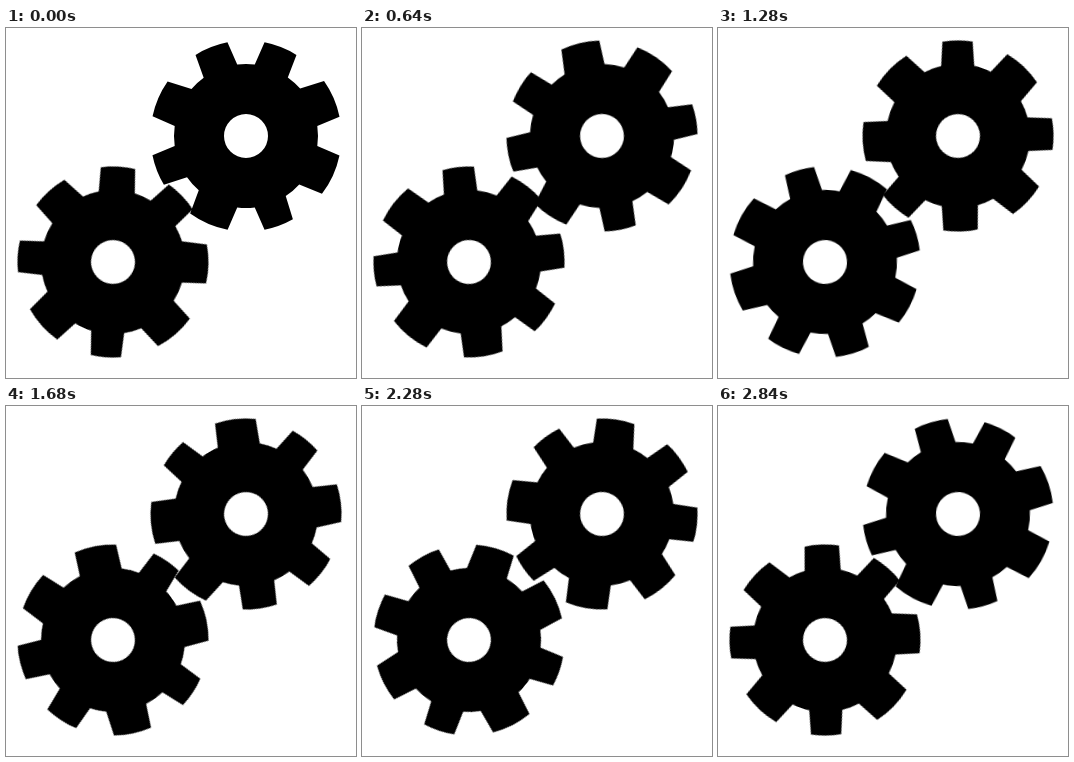
Write an HTML page that moves like this. It is 350 px wide and 350 px high and loops after 2880 ms.

```html
<!DOCTYPE html>
<html lang="en">
<head>
<meta charset="utf-8">
<title>Gears</title>
<style>
  html, body { margin: 0; width: 100%; height: 100%; overflow: hidden; background: #fff; }
  svg { display: block; width: 100%; height: 100%; }
</style>
</head>
<body>
<svg viewBox="0 0 350 350"></svg>
<script>
const LOOP = 2880, STEPS = 72;
const TIP = 95.5, ROOT = 72, HOLE = 22;

// Hand-cut teeth, degrees clockwise from the top: [foot, tip, tip, foot]
const TEETH = [
  [-36, -31.9, -11.2, -7],
  [7, 11.2, 31.9, 35.5],
  [48.8, 54.8, 78.3, 82],
  [98, 101.8, 127.3, 132.3],
  [146.5, 150.6, 168.8, 173],
  [187, 191.1, 215.8, 221],
  [235, 239.3, 258.4, 262],
  [278, 281.9, 304.8, 310.8]
];

const GEARS = [
  { x: 107, y: 234, start: 24.6, turn: 360 },
  { x: 240, y: 108, start: 0, turn: -360 }
];

const svg = document.querySelector('svg');

function point(radius, degrees) {
  const a = degrees * Math.PI / 180;
  return `${(radius * Math.sin(a)).toFixed(2)} ${(-radius * Math.cos(a)).toFixed(2)}`;
}

function arc(radius, degrees) {
  return `A${radius} ${radius} 0 0 1 ${point(radius, degrees)}`;
}

function gearPath() {
  const outline = TEETH.map(([footIn, tipIn, tipOut, footOut], i) => {
    const enter = i ? arc(ROOT, footIn) : 'M' + point(ROOT, footIn);
    return `${enter}L${point(TIP, tipIn)}${arc(TIP, tipOut)}L${point(ROOT, footOut)}`;
  }).join('');
  const close = arc(ROOT, TEETH[0][0]) + 'Z';
  const hole = `M${point(HOLE, 0)}${arc(HOLE, 180)}${arc(HOLE, 360)}Z`;
  return outline + close + hole;
}

const shape = gearPath();

for (const { x, y, start, turn } of GEARS) {
  const gear = document.createElementNS('http://www.w3.org/2000/svg', 'path');
  gear.setAttribute('d', shape);
  gear.setAttribute('fill-rule', 'evenodd');
  svg.append(gear);
  const pose = angle => `translate(${x}px, ${y}px) rotate(${angle}deg)`;
  gear.animate(
    { transform: [pose(start), pose(start + turn)] },
    { duration: LOOP, iterations: Infinity, easing: `steps(${STEPS}, end)` }
  );
}
</script>
</body>
</html>
```
